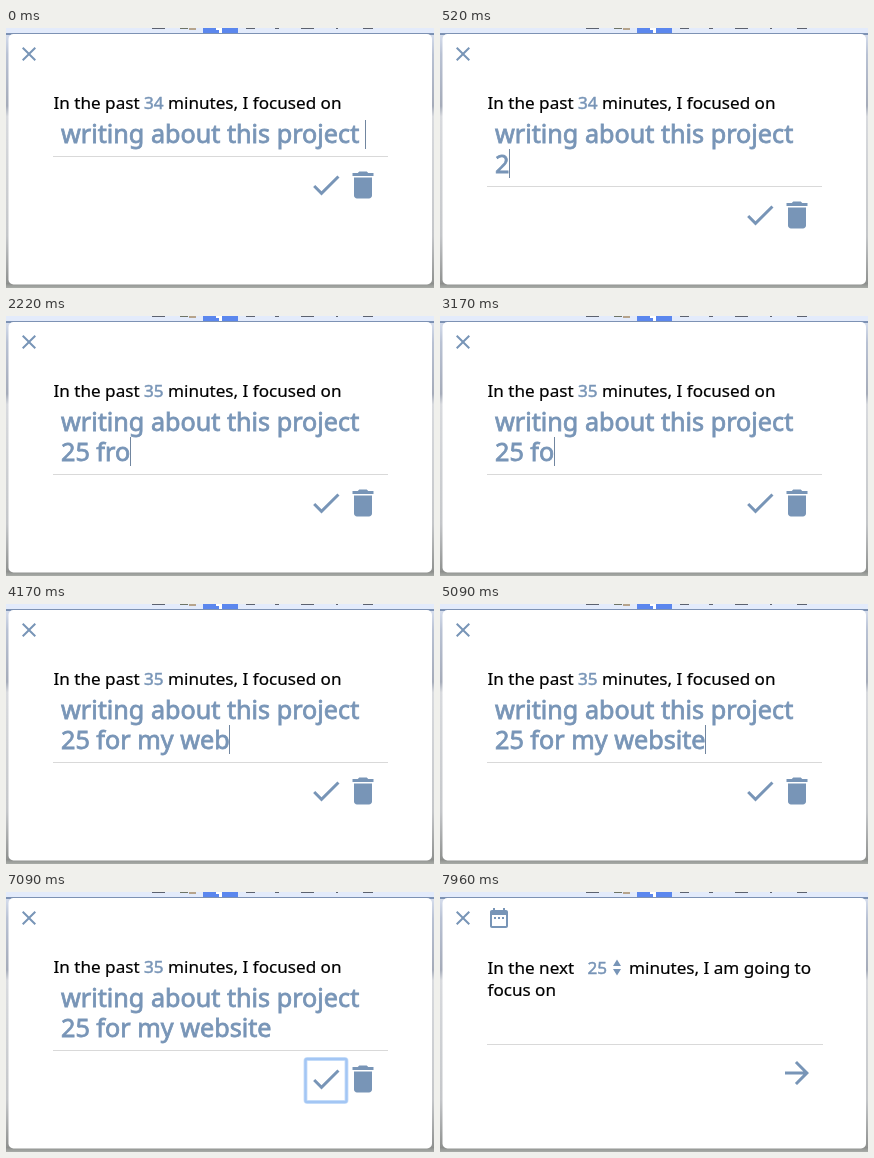
Write an HTML page that moves like this. It is 428 px wide and 260 px high and loops after 8000 ms.

```html
<!DOCTYPE html>
<html lang="en">
<head>
<meta charset="utf-8">
<title>Focus log</title>
<style>
  html, body { margin: 0; width: 100%; height: 100%; overflow: hidden; }
  svg { display: block; width: 428px; height: 260px; }
  text { font-family: "Noto Sans", "Open Sans", sans-serif; white-space: pre; }
  .label { font-size: 17.1px; fill: #000; stroke: #000; stroke-width: .2px; }
  .entry { font-size: 25.2px; }
  .entry, .label .num { fill: #7895b7; stroke: #7895b7; stroke-width: .8px; }
  .label .num { stroke-width: .5px; }
  .icon { fill: #7895b7; }
  .rule { fill: #d9d9d9; }
</style>
</head>
<body>
<svg viewBox="0 0 428 260">
  <defs>
    <linearGradient id="side" x2="0" y2="1">
      <stop offset="0" stop-color="#dfe6f5"/>
      <stop offset=".1" stop-color="#b9c2d4"/>
      <stop offset=".3" stop-color="#a5abb9"/>
      <stop offset=".34" stop-color="#d8dade"/>
      <stop offset=".8" stop-color="#c4c6c9"/>
      <stop offset="1" stop-color="#8a8c8a"/>
    </linearGradient>
    <linearGradient id="shadow" x2="0" y2="1">
      <stop offset="0" stop-color="#8a8c8a"/>
      <stop offset="1" stop-color="#a9aca8"/>
    </linearGradient>
  </defs>

  <rect width="428" height="260" fill="url(#side)"/>
  <rect width="428" height="5" fill="#e3ebfb"/>
  <rect y="5" width="428" height="2" fill="#7d92b4"/>
  <rect x="197" width="35" height="5" fill="#5b87ee"/>
  <path d="M210 0h6v5h-3v-3h-3z" fill="#fff"/>
  <path d="M146 0h13v1h-13zM240 0h9v1h-9zM269 0h4v1h-4zM295 0h13v1h-13zM330 0h2v1h-2zM357 0h10v1h-10z" fill="#5c6270"/>
  <path d="M174 0h8v1h-8z" fill="#6d7466"/>
  <path d="M183 0h7v2h-7z" fill="#b6a48c"/>
  <rect y="255" width="428" height="5" fill="url(#shadow)"/>
  <rect x="2.5" y="6" width="423.5" height="250.5" rx="5" fill="#fff"/>

  <path class="icon" transform="translate(11 14)" d="M19 6.41L17.59 5 12 10.59 6.41 5 5 6.41 10.59 12 5 17.59 6.41 19 12 13.41 17.59 19 19 17.59 13.41 12z"/>

  <g id="review">
    <text class="label" x="47.5" y="80.5">In the past <tspan class="num" id="minutes">34</tspan> minutes, I focused on</text>
    <text class="entry" x="55" y="115" id="first">writing about this project </text>
    <text class="entry" x="55" y="145" id="second"></text>
    <rect id="caret" width="1" height="29" fill="#7186a0"/>
    <g id="footer">
      <rect class="rule" x="47" y="128" width="335" height="1"/>
      <g id="ring" fill="none">
        <rect x="299.5" y="137" width="41" height="43" rx="2" stroke="#cfe2fa" stroke-width="4"/>
        <rect x="299.5" y="137" width="41" height="43" rx="1.5" stroke="#a3c6f4" stroke-width="2.4"/>
      </g>
      <path class="icon" transform="translate(302 139) scale(1.5)" d="M9 16.17L4.83 12l-1.42 1.41L9 19 21 7l-1.41-1.41z"/>
      <path class="icon" transform="translate(339 139) scale(1.5)" d="M6 19c0 1.1.9 2 2 2h8c1.1 0 2-.9 2-2V7H6v12zM19 4h-3.5l-1-1h-5l-1 1H5v2h14V4z"/>
    </g>
  </g>

  <g id="plan">
    <path class="icon" transform="translate(47 14)" d="M9 11H7v2h2v-2zm4 0h-2v2h2v-2zm4 0h-2v2h2v-2zm2-7h-1V2h-2v2H8V2H6v2H5c-1.11 0-2 .9-2 2v14c0 1.1.89 2 2 2h14c1.1 0 2-.9 2-2V6c0-1.1-.9-2-2-2zm0 16H5V9h14v11z"/>
    <text class="label" x="47.5" y="82">In the next</text>
    <text class="label" x="147.5" y="82"><tspan class="num">25</tspan></text>
    <path class="icon" d="M173 74l4-6.5 4 6.5zM173 77h8l-4 6.5z"/>
    <text class="label" x="189" y="82">minutes, I am going to</text>
    <text class="label" x="47.5" y="104">focus on</text>
    <rect class="rule" x="47" y="152" width="336" height="1"/>
    <path class="icon" transform="translate(339 163) scale(1.5)" d="M12 4l-1.41 1.41L16.17 11H4v2h12.17l-5.58 5.59L12 20l8-8z"/>
  </g>
</svg>
<script>
  const LOOP = 8000, MINUTE_AT = 1750, FOCUS_AT = 6880, NEXT_AT = 7720;
  const el = id => document.getElementById(id);
  const show = (id, on) => el(id).setAttribute("visibility", on ? "visible" : "hidden");

  // Key presses: time in ms and key, "<" deletes the last letter.
  const keys = [
    [480, "2"], [700, "5"], [1150, " "], [1600, "f"], [1850, "r"], [2050, "o"],
    [2620, "<"], [2780, "<"], [3080, "o"], [3400, "r"], [3500, " "],
    [3620, "m"], [3740, "y"], [3840, " "], [3950, "w"], [4050, "e"], [4150, "b"],
    [4350, "s"], [4500, "i"], [4620, "t"], [4760, "e"]
  ];

  function typed(t) {
    let text = "", last = 0;
    for (const [at, key] of keys) {
      if (at > t) break;
      text = key === "<" ? text.slice(0, -1) : text + key;
      last = at;
    }
    return { text, last };
  }

  function draw(now) {
    const t = now % LOOP;
    const { text, last } = typed(t);
    const wrapped = text !== "";
    const review = t < NEXT_AT;

    el("review").style.display = review ? "" : "none";
    el("plan").style.display = review ? "none" : "";
    el("minutes").textContent = t < MINUTE_AT ? "34" : "35";
    el("second").textContent = text;
    el("footer").setAttribute("transform", `translate(0 ${wrapped ? 30 : 0})`);

    if (review) {
      const line = el(wrapped ? "second" : "first");
      el("caret").setAttribute("x", Math.round(55 + line.getComputedTextLength() - 0.3));
      el("caret").setAttribute("y", wrapped ? 121 : 92);
    }
    show("caret", t < FOCUS_AT && (t - last) % 1000 < 500);
    show("ring", t >= FOCUS_AT);
  }

  const start = performance.now();
  function tick() {
    draw(performance.now() - start);
    requestAnimationFrame(tick);
  }
  tick();
</script>
</body>
</html>
```
